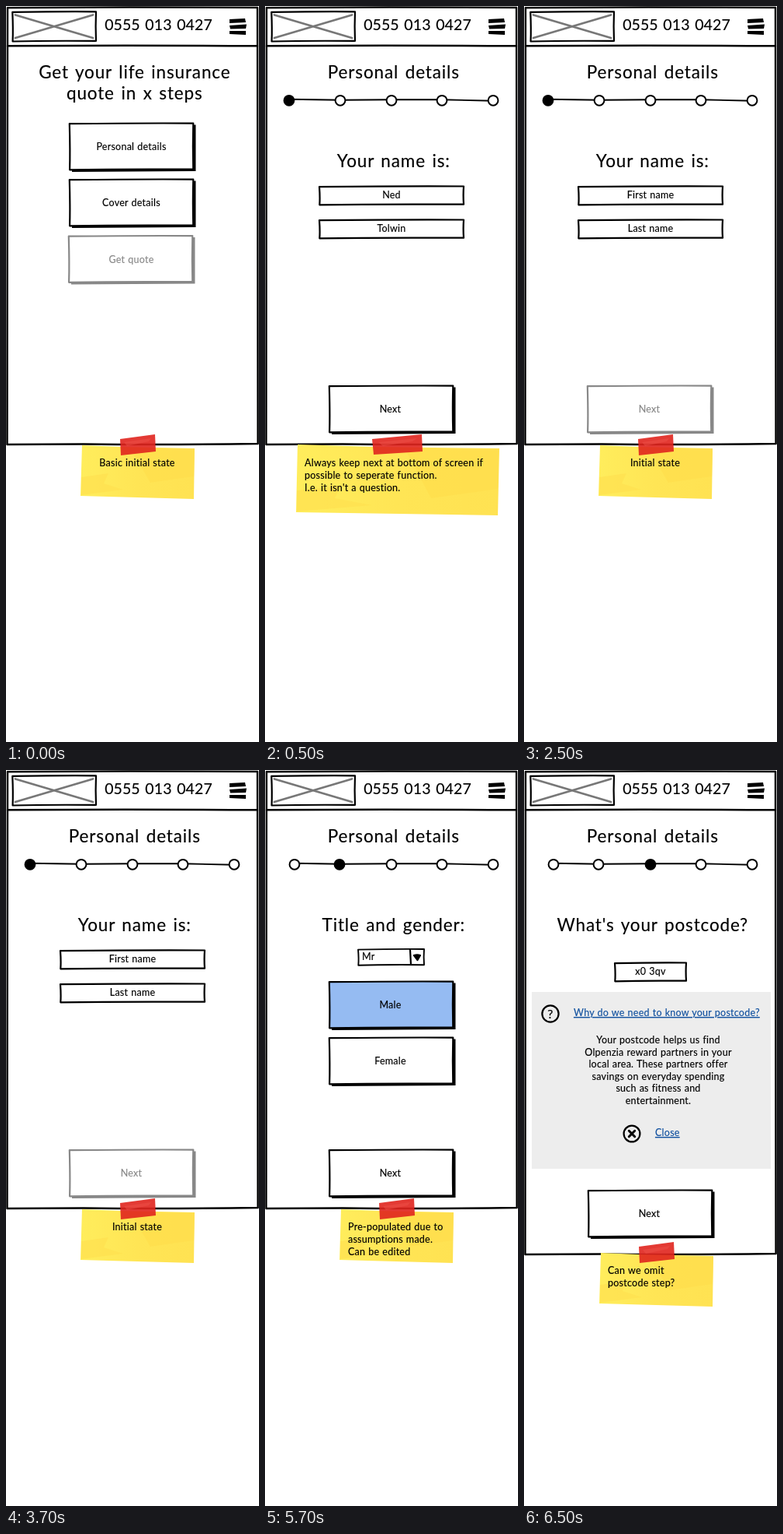
An HTML page that plays this animation: 326x945 px, repeating every 8000 ms.

```html
<!DOCTYPE html>
<html lang="en">
<head>
<meta charset="utf-8">
<title>Quote wireframe</title>
<style>
html, body { margin: 0; width: 100%; height: 100%; overflow: hidden; background: #fff; }
svg { display: block; width: 326px; height: 945px; }
text { font: 12.5px Lato, "Open Sans", sans-serif; letter-spacing: .25px; word-spacing: .5px; fill: currentColor; stroke: currentColor; stroke-width: .15px; }
.title { font-size: 22.5px; letter-spacing: .85px; word-spacing: 2px; }
.phone { font-size: 19.5px; letter-spacing: .1px; word-spacing: 1.5px; }
.help { font-size: 16px; }
.mid { text-anchor: middle; }
.link { color: #10509f; text-decoration: underline; }
.line { fill: none; stroke: currentColor; stroke-width: 2.2; stroke-linecap: round; stroke-linejoin: round; }
.off { color: #888; }
.scene { visibility: hidden; animation: 8s step-end infinite; }
#start { animation-name: start; }
#filled { animation-name: filled; }
#empty { animation-name: empty; }
#gender { animation-name: gender; }
#postcode { animation-name: postcode; }
@keyframes start { 0% { visibility: visible } 6.25%, 100% { visibility: hidden } }
@keyframes filled { 0% { visibility: hidden } 6.25% { visibility: visible } 31.25%, 100% { visibility: hidden } }
@keyframes empty { 0% { visibility: hidden } 31.25% { visibility: visible } 56.25%, 100% { visibility: hidden } }
@keyframes gender { 0% { visibility: hidden } 56.25% { visibility: visible } 81.25%, 100% { visibility: hidden } }
@keyframes postcode { 0% { visibility: hidden } 81.25%, 100% { visibility: visible } }
</style>
</head>
<body>
<svg id="stage" viewBox="0 0 326 945" color="#000"></svg>
<script>
const text = (x, y, s, cls = 'mid') => `<text x="${x}" y="${y}" class="${cls}">${s}</text>`;
const title = (y, s) => text(165.8, y, s, 'title mid');
const lines = (x, y, step, rows, cls) => rows.map((s, i) => text(x, y + i * step, s, cls)).join('');
const path = (d, attrs = '') => `<path d="${d}" class="line" ${attrs}/>`;
const shape = (points, fill, opacity = 1) => `<polygon points="${points}" fill="${fill}" opacity="${opacity}"/>`;

// Rectangle with slightly bowed, uneven sides
const box = (x, y, w, h, fill = '#fff', weight = 2.2) => path(
  `M${x} ${y + .6}Q${x + w * .6} ${y - .4} ${x + w} ${y}` +
  `Q${x + w - .8} ${y + h * .5} ${x + w} ${y + h - .3}` +
  `Q${x + w * .4} ${y + h - .8} ${x + .3} ${y + h + .3}` +
  `Q${x + 1} ${y + h * .6} ${x} ${y + .6}Z`,
  `style="fill:${fill};stroke-width:${weight}"`);

const button = (y, label, { off, fill, x = 83 } = {}) => `<g class="${off ? 'off' : ''}">` +
  shape(`${x + 4},${y + 5} ${x + 162.5},${y + 2.5} ${x + 162.5},${y + 62} ${x + 3},${y + 63}`, 'currentColor') +
  box(x - .2, y + .6, 159.5, 59.4, fill) + text(161.5, y + 35, label) + '</g>';

const field = (x, y, w, s) => box(x, y, w, 23.5) + text(x + w / 2, y + 15.5, s);

const steps = active => {
  const xs = [active ? 38 : 31, active ? 96 : 97, 163, 228, 294];
  return path(`M${xs[0]} 119.7L98 120.8L163 120.2L228 120.2L294 121.8`, 'style="stroke-width:1.9"') +
    xs.map((x, i) => `<circle cx="${x}" cy="121.3" r="6.4" class="line"
      style="stroke-width:2;fill:${i === active ? '#000' : '#fff'}"/>`).join('');
};

const shell = bottom =>
  path(`M2 2.3L160 1.4L324 2Q323.4 ${bottom * .4} 324.6 ${bottom - 1}Q200 ${bottom + .6} 100 ${bottom - .6}L1.5 ${bottom}Q2.6 ${bottom * .5} 2 2.3Z`,
    'style="stroke-width:2.5"') +
  path('M2 51.2Q160 50.2 324 51.3', 'style="stroke-width:2.4"') +
  box(8.3, 7.3, 107.7, 37.9) +
  path('M12 11.5L112 41M12 41L112 11.5', 'style="stroke:#777;stroke-width:2.8"') +
  text(196.5, 31, '0555 013 0427', 'phone mid') +
  shape('288,17 308,16 309,21 288,22', '#000') +
  shape('288,25 310,23.5 309,29 289,29.5', '#000') +
  shape('288,32 309,32 309,37 288,36', '#000');

const smallNote = (dx, dy, content) => `<g transform="translate(${dx} ${dy})">` +
  shape('98,564 147,566 243,568 242,633 96,629', 'url(#paper)') +
  shape('160,568 243,569 242,604 186,612', '#ffde4c', .6) +
  shape('97,605 132,600 126,613 151,621 97,628', '#ffe250', .7) +
  shape('147,556 192,550 193,572 148,577', '#e0251f', .9) +
  shape('152,560 187,555 184,559 156,565', '#ee5148', .5) + '</g>' + content;

const wideNote = content =>
  shape('42,563 140,566 302,568 300,654 40,650', 'url(#paper)') +
  shape('180,568 301,570 300,620 214,632', '#ffde4c', .6) +
  shape('41,622 98,616 90,632 138,641 41,649', '#ffe250', .7) +
  shape('138,556 202,550 203,572 140,576', '#e0251f', .9) +
  shape('146,560 196,555 190,559 152,565', '#ee5148', .5) + content;

const nameForm = (first, last, off) => shell(563) + title(93, 'Personal details') + steps(0) +
  title(207, 'Your name is:') + field(70, 231.5, 186, first) + field(70, 274.5, 186, last) +
  button(487, 'Next', { off, x: off ? 82 : 83 });

const paper = `<linearGradient id="paper"><stop stop-color="#ffed5c"/>
  <stop offset=".5" stop-color="#ffe555"/><stop offset="1" stop-color="#ffe252"/></linearGradient>`;

const scenes = {
  start: shell(563) + title(93, 'Get your life insurance') + title(120, 'quote in x steps') +
    button(150, 'Personal details', { x: 82 }) + button(222, 'Cover details', { x: 82 }) +
    button(294.5, 'Get quote', { off: true, x: 81 }) +
    smallNote(0, 0, text(169, 591, 'Basic initial state')),

  filled: nameForm('Ned', 'Tolwin') + wideNote(lines(51, 591, 16,
    ['Always keep next at bottom of screen if', 'possible to seperate function.', "I.e. it isn't a question."], '')),

  empty: nameForm('First name', 'Last name', true) + smallNote(0, 0, text(169, 591, 'Initial state')),

  gender: shell(563) + title(93, 'Personal details') + steps(1) + title(207, 'Title and gender:') +
    box(120, 230, 85, 20.5, '#fff', 1.9) + path('M187 230.5L188 250') + text(125, 244, 'Mr', '') +
    path('M192 238Q196 236.5 200 238L196.5 244Z', 'style="fill:#000"') +
    button(271, 'Male', { fill: '#95bbf2' }) + button(343, 'Female') + button(487, 'Next') +
    smallNote(0, 0, lines(107, 591, 16, ['Pre-populated due to', 'assumptions made.', 'Can be edited'], '')),

  postcode: shell(622) + title(93, 'Personal details') + steps(2) + title(207, "What's your postcode?") +
    field(117, 247.5, 92, 'x0 3qv') +
    '<rect x="10" y="285" width="308" height="227" fill="#ededed"/>' +
    '<circle cx="34" cy="313" r="10.6" class="line"/>' + text(34, 318.7, '?', 'help mid') +
    text(64, 316, 'Why do we need to know your postcode?', 'link') +
    lines(173, 351, 15.6, ['Your postcode helps us find', 'Olpenzia reward partners in your',
      'local area. These partners offer', 'savings on everyday spending', 'such as fitness and', 'entertainment.'], 'mid') +
    '<circle cx="139" cy="467" r="10.4" class="line"/>' +
    path('M135.3 463.3L142.7 470.7M142.7 463.3L135.3 470.7', 'style="stroke-width:3"') +
    text(169, 470, 'Close', 'link') + button(539, 'Next') +
    smallNote(1, 56, lines(108, 647, 16, ['Can we omit', 'postcode step?'], ''))
};

document.getElementById('stage').innerHTML = `<defs>${paper}</defs>` + Object.entries(scenes)
  .map(([id, body]) => `<g class="scene" id="${id}">${body}</g>`).join('');
</script>
</body>
</html>
```
